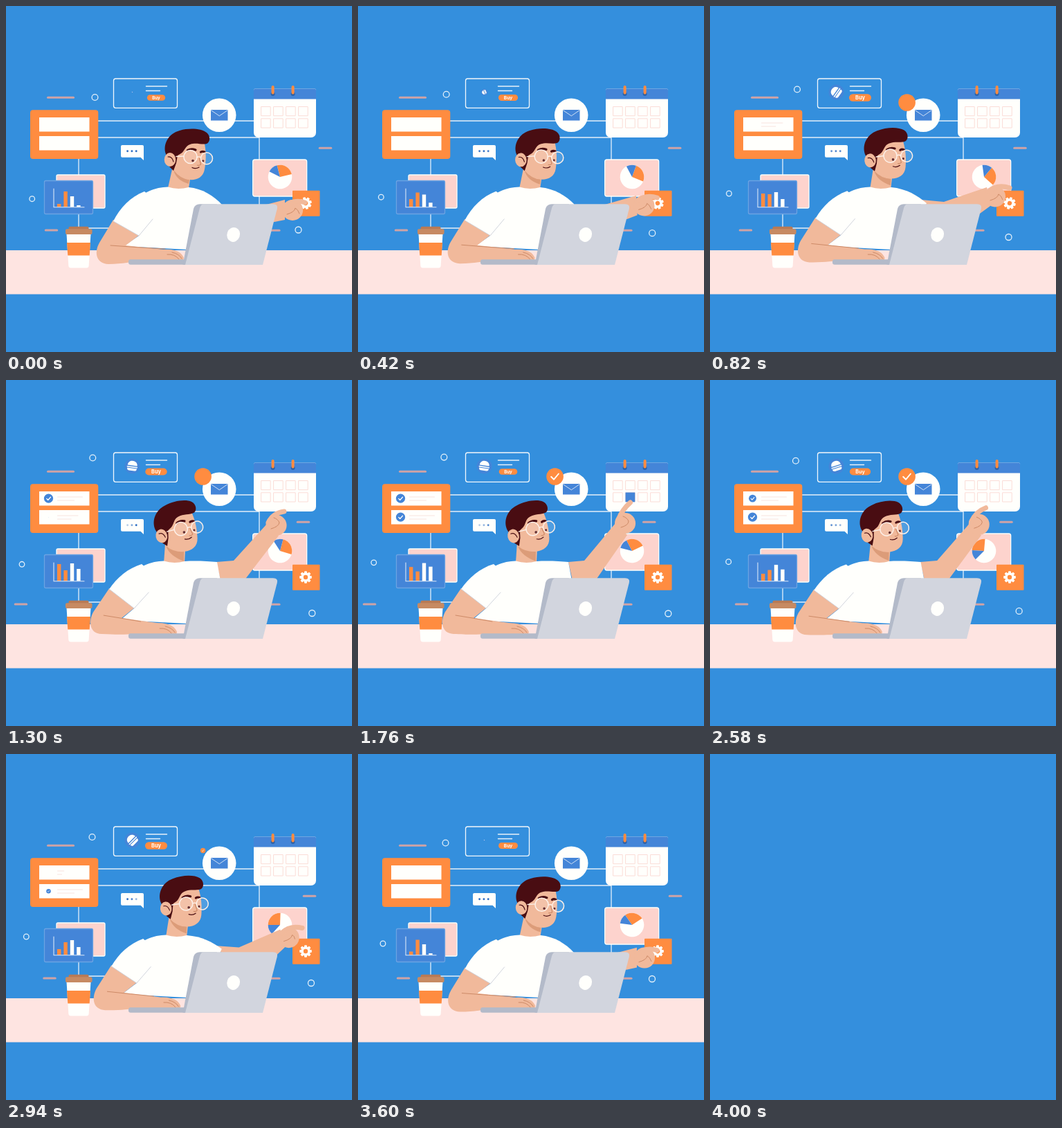
Animation, 500 px wide and 500 px high, one loop 4020 ms. Source, as an HTML page with a canvas:

```html
<!DOCTYPE html>
<html lang="en">
<head>
<meta charset="utf-8">
<title>Working at a laptop</title>
<style>
html, body { margin: 0; width: 100%; height: 100%; overflow: hidden; background: #348fdd; }
canvas { display: block; }
</style>
</head>
<body>
<canvas width="500" height="500"></canvas>
<script>
const g = document.querySelector('canvas').getContext('2d');
const LOOP = 4020, CYCLE = 4000, RAD = Math.PI / 180;
const SKY = '#348fdd', BLUE = '#4485d8', ORANGE = '#ff8c40', PINK = '#fdd3cd', DESK = '#fee4e1',
  WHITE = '#fffffc', SKIN = '#f1b99b', SHADE = '#cd8a67', HAIR = '#490d12', DASH = '#cfa3a6';
const KEYS = [0, 820, 1300, 2240, 2940, 3600];
let t = 0;

// ---- motion ----
const clamp = (x, a = 0, b = 1) => Math.min(b, Math.max(a, x));
const ease = x => { x = clamp(x); return x * x * (3 - 2 * x); };
const pop = (a, b, c, d) => ease((t - a) / (b - a)) * (1 - ease((t - c) / (d - c)));

// Smooth periodic curve through values at key times; flat removes overshoot.
function at(v, flat = false, keys = KEYS) {
  const n = v.length;
  const V = i => v[(i + n) % n], T = i => keys[(i + n) % n] + CYCLE * Math.floor(i / n);
  const slope = i => (V(i + 1) - V(i)) / (T(i + 1) - T(i));
  const tangent = i => {
    const a = slope(i - 1), b = slope(i), h = T(i) - T(i - 1), k = T(i + 1) - T(i);
    return flat && a * b <= 0 ? 0 : (a * k + b * h) / (h + k);
  };
  let i = n - 1;
  while (keys[i] > t) i--;
  const h = T(i + 1) - T(i), u = (t - T(i)) / h, s = u * u * (3 - 2 * u);
  return V(i) + (V(i + 1) - V(i)) * s + h * u * (1 - u) * ((1 - u) * tangent(i) - u * tangent(i + 1));
}

// Blend two paths that have the same commands.
function mix(a, b, p) {
  const to = b.match(/-?[\d.]+/g);
  let i = 0;
  return a.replace(/-?[\d.]+/g, n => (+n + (to[i++] - n) * p).toFixed(2));
}

// ---- drawing helpers ----
function fill(d, c) { g.fillStyle = c; g.fill(new Path2D(d)); }
function line(d, c, w = 1) { g.strokeStyle = c; g.lineWidth = w; g.stroke(new Path2D(d)); }
function box(x, y, w, h, r, c, edge) {
  g.beginPath();
  g.roundRect(x, y, w, h, r);
  if (c) { g.fillStyle = c; g.fill(); }
  if (edge) { g.strokeStyle = edge; g.lineWidth = 1.3; g.stroke(); }
}
function dot(x, y, r, c, ry = r) {
  g.beginPath();
  g.ellipse(x, y, r, ry, 0, 0, 7);
  g.fillStyle = c;
  g.fill();
}
function ring(x, y, r, w = 1.3, c = '#e5f1fa') {
  g.beginPath();
  g.arc(x, y, r, 0, 7);
  g.strokeStyle = c;
  g.lineWidth = w;
  g.stroke();
}
function wedge(r, from, to, c) {
  g.beginPath();
  g.moveTo(0, 0);
  g.arc(0, 0, r, from * RAD, to * RAD);
  g.fillStyle = c;
  g.fill();
}
function group(x, y, scale, angle, draw) {
  if (scale < .01) return;
  g.save();
  g.translate(x, y);
  g.rotate(angle * RAD);
  g.scale(scale, scale);
  draw();
  g.restore();
}
const dash = (x, y, w) => line(`M${x - w / 2} ${y}h${w}`, DASH, 3);

// ---- background pieces ----
function drift() {
  dash(79, 132.3, 37);
  dash(388, 324.2, 14);
  dash(at([461.5, 448, 429.5, 421, 438.5, 458.5]), 205.2, 16.5);
  dash(at([65.5, 51.5, 21.5, 28.5, 63, 65.5]), 324, 16.5);
  ring(at([128.5, 126, 125.3, 123.7, 124.5, 126.5]), at([132, 120.5, 112.5, 114.5, 120, 128.5]), 4.4);
  ring(at([37.7, 27.5, 23, 25, 29.3, 36]), at([278.7, 271, 266.3, 263, 264, 274]), 3.8);
  ring(at([422.5, 431.5, 442.3, 449.5, 441, 425]), at([323.5, 334, 337, 336, 331, 325]), 4.5);
}

function taskRow(y, tick, text) {
  box(48, y, 72.5, 20.5, 0, WHITE);
  group(61.5, y + 10.2, tick, 0, () => {
    dot(0, 0, 6.6, BLUE);
    line('M-2.8 .2L-.8 2.3L3 -2', WHITE, 1.3);
  });
  if (text > .02) line(`M74.5 ${y + 8}h${36 * text}M74.5 ${y + 13}h${24 * text}`, '#f7e3df', 1);
}

function shopCard() {
  box(155.5, 105, 92, 42.3, 3, null, '#f2f8fc');
  line('M202.5 116H232.5M202.5 122.5H222.5', '#e8f2fa', 1.4);
  const pulse = ease((1 - Math.cos(t / CYCLE * 4 * Math.PI)) / 2);
  group(217, 132.5, .82 + .18 * pulse, 0, () => {
    box(-16, -5.2, 32, 10.4, 5.2, ORANGE);
    g.fillStyle = WHITE;
    g.font = '700 7.5px Inter, sans-serif';
    g.textAlign = 'center';
    g.textBaseline = 'middle';
    g.fillText('Buy', 0, .3);
  });
  const size = Math.max(.08, pop(150, 750, 3050, 3560));
  group(182.5, 124.5, size, at([-150, -55, 8, 0, -45, -115], true), () => {
    dot(0, 0, 11, BLUE);
    fill('M-7 -1C-7 -10 7 -10 7 -1Z', WHITE);
    line('M-7 1.2H7', WHITE, 1.6);
    fill('M-7 3H7Q7 6.5 4 6.5H-4Q-7 6.5 -7 3Z', WHITE);
  });
}

function mail() {
  dot(308.2, 157.7, 24.3, WHITE);
  box(296, 150, 24.5, 15.5, 0, BLUE);
  line('M296.5 150.8L308.3 158.8L320 150.8', '#dfeaf8', .9);
  group(284.6, 139.5, pop(480, 760, 2700, 3080), 0, () => {
    dot(0, 0, 12.3, ORANGE);
    const tick = pop(1400, 1700, 3100, 3200);
    g.save();
    g.beginPath();
    g.rect(-7, -8, 14 * tick, 16);
    g.clip();
    line('M-5.5 .3L-1.5 4.2L5.3 -4', WHITE, 1.9);
    g.restore();
  });
}

function calendar() {
  box(358, 119.5, 90, 70.5, [2, 2, 7, 7], WHITE);
  box(358, 119.5, 90, 15, [2, 2, 0, 0], BLUE);
  for (const x of [385.6, 414.6]) {
    dot(x, 127, 3, '#2f62a8');
    line(`M${x} 117V125.5`, ORANGE, 4);
  }
  for (let i = 0; i < 8; i++) {
    const x = 369 + i % 4 * 18, y = i < 4 ? 145.5 : 162.8;
    const picked = i === 5 && t > 1700 && t < 2450;
    g.lineWidth = 1;
    g.strokeStyle = '#fbdcd7';
    g.strokeRect(x, y, 13.2, 13.2);
    if (picked) box(x - .5, y - .3, 13.8, 13.8, 0, BLUE);
  }
}

function chat() {
  fill('M168 201H197Q199 201 199 203V223L194.5 218.7H168Q166 218.7 166 216.7V203Q166 201 168 201Z', WHITE);
  const glow = [[1, .75, .35, .45, 1, 1], [1, .85, .6, .5, .85, 1], [1, .8, 1, .55, .5, 1]];
  glow.forEach((v, i) => {
    g.globalAlpha = clamp(at(v, true));
    dot(175.6 + i * 6.3, 209.8, 1.45, '#2f6fc4');
  });
  g.globalAlpha = 1;
}

function barChart() {
  box(73, 244, 70, 48, 2, PINK, WHITE);
  box(55.5, 252.5, 70, 48, 2, BLUE, '#6ba3e2');
  const tops = [[286, 271, 266, 277.5, 282, 285.5], [268, 272, 275, 276.5, 272, 268.5],
    [275, 269, 265, 266, 269, 275], [288, 279, 273, 270, 279, 288]];
  tops.forEach((v, i) => {
    const y = at(v);
    box(74 + i * 9.4, y, 5.4, 290.5 - y, 0, i < 2 ? ORANGE : WHITE);
  });
  line('M69 264V290.7H113', '#dbe8f7', 1.1);
}

function pieAndGear() {
  box(356.7, 222, 78, 53, 3, PINK, WHITE);
  group(396, 247, 1, at([-15, 40, 15, -70, -90, -35]) - 90, () => {
    dot(0, 0, 17.3, WHITE);
    wedge(17.3, 0, 92, ORANGE);
    wedge(17.3, -48, 0, BLUE);
  });
  box(414, 266.7, 39.5, 37, 1, ORANGE);
  group(433, 285, 1, at([-60, 15, 0, 0, 0, -45], true), () => {
    dot(0, 0, 6.8, WHITE);
    for (let i = 0; i < 8; i++) {
      g.rotate(Math.PI / 4);
      box(-1.9, -8.8, 3.8, 4, .8, WHITE);
    }
    dot(0, 0, 3.2, ORANGE);
  });
}

function scene() {
  box(0, 353, 500, 63.5, 0, DESK);
  line('M133 166H358M133 190H366V300M105 221V321H165', '#e4f0fa', 1.3);
  drift();
  box(35, 150.3, 98.3, 70.7, 4, ORANGE);
  taskRow(161, pop(850, 1150, 2500, 2800), pop(580, 900, 2700, 3060));
  taskRow(188, pop(1270, 1560, 2780, 3100), pop(1060, 1390, 2960, 3300));
  shopCard();
  mail();
  calendar();
  chat();
  barChart();
  pieAndGear();
}

// ---- person: poses from touching the gear to touching the calendar ----
const REACH = [{
  arm: 'M312 290L345 295L403 280L403 309L388 312L320 312Z',
  fist: 'M414 295h.1',
  finger: 'M403 289Q416 279 432 284',
  crease: 'M406 301q11 -3 12 -9q4 2 6 8',
  shoulder: 'M240 278L264 262C284 264 300 274 312 287L302 300L240 300Z'
}, {
  arm: 'M305 280L338 283L400 262L405 289L390 300L320 300Z',
  fist: 'M412 275.5h.1',
  finger: 'M402 269Q414 257 433 263',
  crease: 'M405 281q11 -3 12 -9q4 2 6 8',
  shoulder: 'M240 278L262 262C284 264 300 274 313 285L304 300L240 300Z'
}, {
  arm: 'M304 263L329 261L377 208L394 225L344 290L310 290Z',
  fist: 'M390.5 210h.1',
  finger: 'M379 206Q386 192 402 190',
  crease: 'M383 215q11 -3 12 -9q-2 -5 -8 -7',
  shoulder: 'M235 278L258 262C274 261 292 262 305 263L310 290L235 300Z'
}, {
  arm: 'M304 263L327 261L372 207L389 224L343 290L310 290Z',
  fist: 'M386 207h.1',
  finger: 'M376 202Q382 187 393.5 177',
  crease: 'M380 213q11 -3 11 -9q-2 -5 -8 -7',
  shoulder: 'M235 278L258 262C274 261 292 262 304 263L309 290L235 300Z'
}];

const LEAN = {
  neck: ['M241 232L234 263Q248 270 264 263L267 245Z', 'M230 234L228 263Q242 270 258 263L259 243Z'],
  shade: ['M242 237Q252 250 265 251L264 257Q246 252 242 237Z', 'M231 240Q242 249 257 248L257 262Q236 254 231 240Z'],
  torso: ['M180 290C196 268 216 262 234 261.5Q248 266 264 262L300 290L262 352L170 347L192 332Z',
    'M174 290C190 268 210 262 228 261.5Q242 266 258 262L300 290L262 352L165 347L185 330Z'],
  arm: ['M155 309L135 342C127 356 130 372 148 373C170 373 180 369 200 368L256 367Q259 364 252 357Q244 351 228 352L173 346L194 330Z',
    'M149 301L126 335C119 348 120 366 138 367C160 368 170 368 190 367L246 367Q249 364 242 357Q234 351 218 351L167 344L187 328Z'],
  crease: ['M151 346Q190 349 230 351M233 359Q244 358 250 366M240 356Q250 358 254 365',
    'M141 340Q166 344 194 349M222 359Q233 358 239 366M230 356Q240 358 244 365'],
  sleeve: ['M155 311C165 291 180 276 200 268L222 285L212 308L192 332Z',
    'M149 302C160 286 176 272 196 266L216 284L206 307L185 330Z'],
  fold: ['M155 311L192 332L212 308', 'M149 302L185 330L206 307']
};

function head(p) {
  g.save();
  g.translate(250 - 6.7 * p, 250);
  g.rotate(-12.5 * p * RAD);
  g.translate(-250, -250);
  fill('M241 205L286 195C290 210 289 225 287 236C285 248 275 252 265 251C252 249 243 240 240 228Z', SKIN);
  fill('M231 214C226 200 235 184 251 180C265 176 282 177 290 183C296 188 295 197 290 199C283 201 275 197 266 200C259 202 258 210 253 213L248 216L246 227L242 238L236 232Z', HAIR);
  dot(237, 222, 8.3, SKIN, 10);
  line('M234 218Q240 217 242 225', HAIR, 1.1);
  line('M262.5 208.5Q268 205.5 274 208M281.5 211Q284 209.5 287 211', HAIR, 3.2);
  dot(270, 223.6, 1.8, HAIR);
  dot(284.8, 223.8, 1.6, HAIR);
  line('M279.5 220L281.5 229Q279 231 276.5 230', SHADE, 1.2);
  line('M269 233.5Q274 236 279 233', HAIR, 1.2);
  dot(266.5, 218, 9.6, 'rgba(255,255,255,.14)');
  dot(290, 220.3, 8.5, 'rgba(255,255,255,.14)');
  ring(266.5, 218, 9.6, 1.5, '#fdf0e8');
  ring(290, 220.3, 8.5, 1.5, '#fdf0e8');
  line('M246 217.5L257 217M276 218.5Q279 217 281.5 219', '#fdf0e8', 1.4);
  g.restore();
}

function person() {
  const p = clamp(at([0, .43, .98, 1, .46, .07], true));
  const q = clamp(at([0, 1, 2, 3, 3, 1.16, .02], true, [0, 820, 1300, 1700, 2300, 2940, 3600]), 0, 3);
  const i = Math.min(2, Math.floor(q));
  const reach = part => mix(REACH[i][part], REACH[i + 1][part], q - i);
  const lean = part => mix(...LEAN[part], p);

  fill(reach('arm'), SKIN);
  line(reach('fist'), SKIN, 30);
  line(reach('finger'), SKIN, 7);
  line(reach('crease'), SHADE, 1);
  fill(lean('neck'), SKIN);
  fill(lean('shade'), '#dc9c79');
  fill(lean('torso'), WHITE);
  fill(reach('shoulder'), WHITE);
  fill(lean('arm'), SKIN);
  line(lean('crease'), SHADE, 1);
  fill(lean('sleeve'), WHITE);
  line(lean('fold'), '#cbd0d8', .9);
  head(p);
}

function laptop() {
  box(177, 366.3, 90, 7.5, [3, 0, 0, 3], '#b3bac9');
  fill('M280 286.3H305L275 374H255.5L271 293Q273 286.3 280 286.3Z', '#b3bac9');
  fill('M286 286.3H386Q393.5 286.3 391.8 293L371 374H259L280 292Q281.5 286.3 286 286.3Z', '#d2d5de');
  group(328.7, 330.4, 1, 20, () => dot(0, 0, 9.3, WHITE, 10.6));
}

function cup() {
  fill('M87.5 329H122.5L119.7 375Q119.5 378.5 116 378.5H94Q90.5 378.5 90.3 375Z', WHITE);
  fill('M88 342H122L120.7 360.5H89.3Z', ORANGE);
  box(90.5, 318.8, 29, 6, 2, '#b87a55');
  box(86, 322.3, 38.5, 7.7, 2, '#c78a62');
}

function frame(now) {
  t = now % LOOP;
  g.fillStyle = SKY;
  g.fillRect(0, 0, 500, 500);
  if (t < CYCLE) {
    g.lineCap = g.lineJoin = 'round';
    scene();
    person();
    laptop();
    cup();
  }
  requestAnimationFrame(frame);
}
const start = performance.now();
requestAnimationFrame(function first(now) { frame(Math.max(0, now)); });
</script>
</body>
</html>
```
